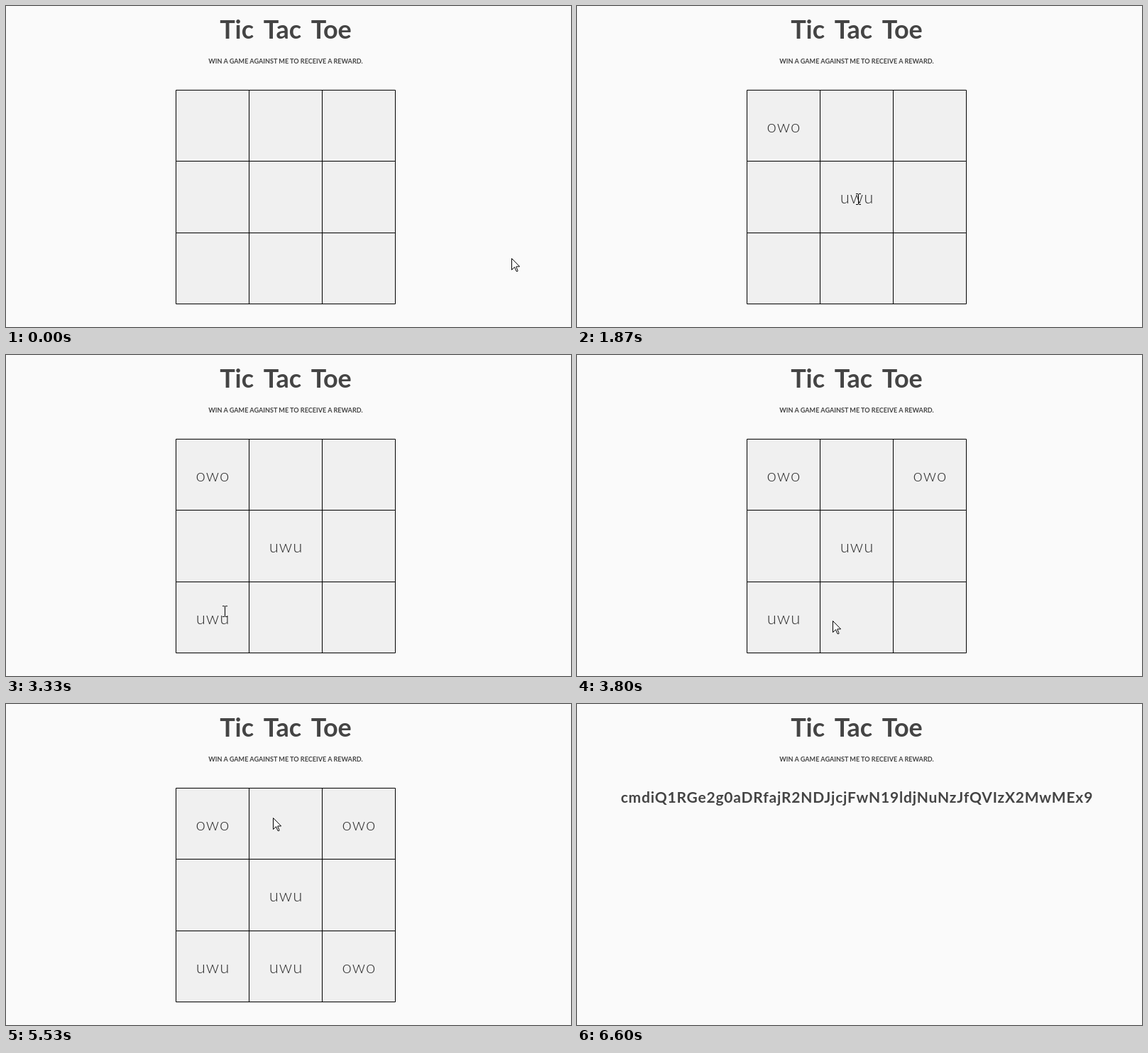
Write an HTML page that moves like this. It is 796x452 px and loops after 6990 ms.

```html
<!DOCTYPE html>
<html lang="en">
<head>
<meta charset="utf-8">
<title>Tic Tac Toe</title>
<style>
  html, body { margin: 0; width: 100%; height: 100%; overflow: hidden; background: #fafafa; }
  svg { display: block; width: 796px; height: 452px; }
  text { font-family: Lato, "Open Sans", sans-serif; fill: #444; text-anchor: middle; }
  .title { font-size: 36px; font-weight: 700; word-spacing: 6px; }
  .hint { font-size: 9.1px; font-weight: 700; }
  .code { font-size: 21px; font-weight: 700; letter-spacing: .8px; }
  .mark { font-size: 24px; font-weight: 300; letter-spacing: 1px; fill: #333; }
  .grid { fill: #f0f0f0; stroke: #000; }
</style>
</head>
<body>
<svg viewBox="0 0 796 452">
  <text class="title" x="394" y="46">Tic Tac Toe</text>
  <text class="hint" x="394" y="81">WIN A GAME AGAINST ME TO RECEIVE A REWARD.</text>
  <g id="board">
    <path class="grid" d="M239.5 118.5H548.5V419.5H239.5ZM342.5 118.5V419.5M445.5 118.5V419.5M239.5 218.5H548.5M239.5 319.5H548.5"/>
  </g>
  <text id="reward" class="code" x="394.4" y="139">cmdiQ1RGe2g0aDRfajR2NDJjcjFwN19ldjNuNzJfQVIzX2MwMEx9</text>
  <path id="arrow" fill="#fff" stroke="#000" d="M.5 .5V16.5L4.5 12.7L7 18.5H8.8L9 17.6L6.8 12.4V11.9H11.6Z"/>
  <path id="beam" fill="none" stroke="#000" d="M0 .5H3M4 .5H7M3.5 1V15M0 15.5H3M4 15.5H7"/>
</svg>
<script>
  const LOOP = 6990, WIN = 5670, EXIT = 6600, REPLY = 1000;
  const $ = id => document.getElementById(id);
  const show = (el, on) => el.setAttribute('visibility', on ? 'visible' : 'hidden');

  function addMark(label, col, row, at) {
    const el = document.createElementNS('http://www.w3.org/2000/svg', 'text');
    const x = 291 + 103 * col, y = Math.round(178 + 100.4 * row);
    el.setAttribute('class', 'mark');
    el.setAttribute('x', x + 0.5);
    el.setAttribute('y', y);
    el.textContent = label;
    $('board').append(el);
    return { el, x, y, at };
  }

  // the visitor's click and cell, then the cell of the reply
  const marks = [
    { at: 800, cell: [1, 1], reply: [0, 0] },
    { at: 2530, cell: [0, 2], reply: [2, 0] },
    { at: 4130, cell: [1, 2], reply: [2, 2] }
  ].flatMap(({ at, cell, reply }) => [
    addMark('uwu', ...cell, at),
    addMark('owo', ...reply, at + REPLY)
  ]);

  // pointer moves: start, end, x, y, upward bend
  const home = [712, 355];
  const moves = [
    [0, 70, 704, 337],
    [200, 670, 406, 262, 70],
    [1070, 1200, 408, 263],
    [1730, 2400, 304, 336],
    [2600, 3330, 308, 360],
    [3330, 4000, 374, 378],
    [4200, 4270, 375, 378],
    [4400, 4470, 376, 378],
    [5070, 5530, 376, 160],
    [5730, EXIT, 130, 434]
  ];

  function pointerAt(t) {
    let [x, y] = home;
    for (const [from, to, tx, ty, bend = 0] of moves) {
      if (t <= from) break;
      const k = Math.min(1, (t - from) / (to - from));
      const e = k * k * (3 - 2 * k);
      x += (tx - x) * e;
      y += (ty - y) * e - bend * Math.sin(Math.PI * e);
    }
    return [Math.round(x), Math.round(y)];
  }

  // the screen refreshes 15 times a second, on 10 ms stamps
  const snap = t => Math.round(Math.floor((t + 3.4) * 0.015) * 20 / 3) * 10;

  function draw(time) {
    const t = snap(time % LOOP);
    const playing = t < WIN;
    const [x, y] = pointerAt(t);
    let overText = false;
    for (const m of marks) {
      const on = playing && t >= m.at;
      show(m.el, on);
      if (on && Math.abs(x - m.x) <= 23 && y >= m.y - 22 && y <= m.y + 8) overText = true;
    }
    show($('board'), playing);
    show($('reward'), !playing);
    show($('arrow'), t < EXIT && !overText);
    show($('beam'), t < EXIT && overText);
    $('arrow').setAttribute('transform', `translate(${x} ${y})`);
    $('beam').setAttribute('transform', `translate(${x - 3} ${y - 7})`);
  }

  const start = performance.now();
  function tick() {
    draw(performance.now() - start);
    requestAnimationFrame(tick);
  }
  tick();
</script>
</body>
</html>
```
